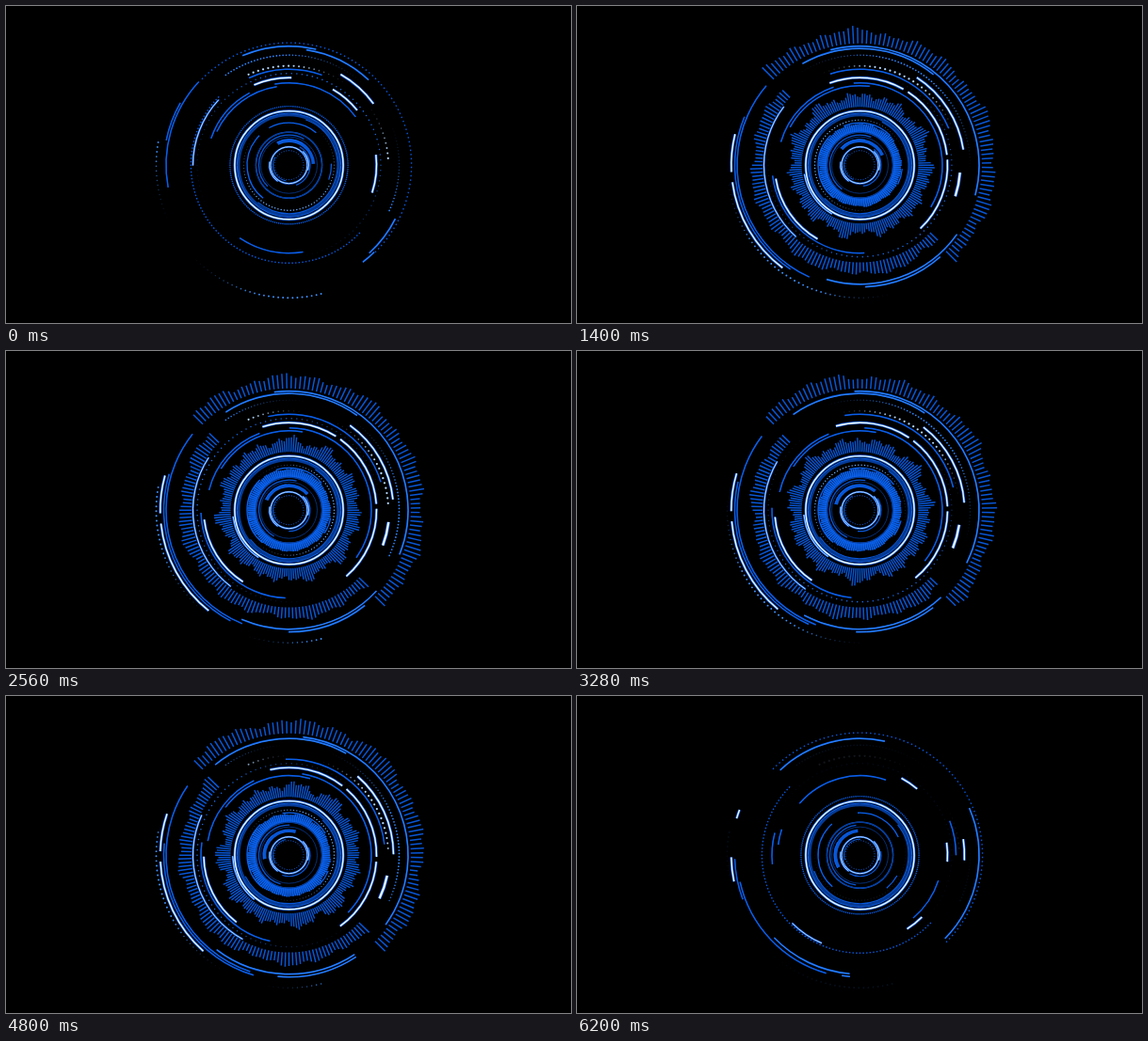
Animation, 600 px wide and 337 px high, one loop 6240 ms. Source, as an HTML page with a canvas:

```html
<!DOCTYPE html>
<html lang="en">
<head>
<meta charset="utf-8">
<title>HUD rings</title>
<style>
html, body { margin: 0; width: 100%; height: 100%; overflow: hidden; background: #000; }
canvas { display: block; width: 600px; height: 337px; }
</style>
</head>
<body>
<canvas id="stage" width="600" height="337"></canvas>
<script>
const ctx = document.getElementById('stage').getContext('2d');
const LOOP = 6240, CX = 300.5, CY = 169.2;
const BLUE = '#0a62f0', DEEP = '#0856d6', DIM = '#063a94', WHITE = '#f4faff';
const RAD = Math.PI / 180;

const clamp = x => Math.max(0, Math.min(1, x));
const ramp = (t, a, b) => clamp((t - a) / (b - a));
const smooth = x => x * x * (3 - 2 * x);
const mix = (a, b, k) => a + (b - a) * k;
const easeOut = x => 1 - (1 - x) ** 3;

function stroke(r, a, b, color, width) {
  ctx.beginPath();
  ctx.arc(CX, CY, r, Math.min(a, b) * RAD, Math.max(a, b) * RAD);
  ctx.strokeStyle = color;
  ctx.lineWidth = width;
  ctx.stroke();
}

// Each style is a halo under a narrower core.
const styles = {
  bold: [3.6, '#0a62f0', 2.2, WHITE],
  white: [2.8, '#0a62f0', 1.4, WHITE],
  thin: [2.1, '#0a62f0', .9, '#cfe6ff'],
  bright: [1.7, '#0a62f0', .7, '#3f94ff'],
  blue: [1.5, '#0a5ce4', .5, '#0a62f0']
};

function line(r, a, b, style = 'blue') {
  if (Math.abs(a - b) < 0.2) return;
  const [halo, outer, core, inner] = styles[style];
  stroke(r, a, b, outer, halo);
  stroke(r, a, b, inner, core);
}

// r: radius, a: first angle, len: signed sweep, v: degrees per second,
// grown: part drawn at the start, left: part remaining at the end,
// back: retract towards the first angle
const arcs = [
  { r: 136.7, a: 125, len: 45.4, v: 1.4, grown: 0, left: .24, style: 'white' },
  { r: 136.7, a: 175, len: 17, v: 1.4, grown: 0, left: .24, style: 'white' },
  { r: 111, a: -60.4, len: 48.5, v: 2.37, grown: .5, left: .24, style: 'white' },
  { r: 93, a: -113.5, len: 50, v: 2.3, grown: .5, left: .25, style: 'white' },
  { r: 93, a: -60, len: 50, v: 2.3, grown: .42, left: .25, style: 'white' },
  { r: 93, a: -6.8, len: 50, v: 2.3, grown: .5, left: .25, style: 'white' },
  { r: 90.5, a: 116.5, len: 51, v: 2.4, grown: 0, left: 0, style: 'white' },
  { r: 106.5, a: 1.2, len: 13.8, v: 2.2, grown: 0, left: 0, style: 'bold' },
  { r: 59.8, a: 116.5, len: 51, v: 2.4, grown: 0, left: 0, style: 'thin' },
  { r: 102, a: 223, len: -86, v: -3.8, grown: .5, left: .25, style: 'thin' },
  { r: 93.5, a: 80.8, len: 86, v: 4.5, grown: .5, left: .24 },
  { r: 124, a: -47, len: -68.5, v: -2.85, grown: .5, left: .81, style: 'bright' },
  { r: 126.5, a: -113, len: 119, v: 6.2, grown: .3, left: .57, style: 'bright' },
  { r: 126.5, a: 26.8, len: 70.8, v: 6.2, grown: .29, left: .58, style: 'bright' },
  { r: 129.5, a: 45.6, len: 38.7, v: 2.3, grown: .18, left: .1, style: 'bright' },
  { r: 130.5, a: 222.8, len: -106, v: -1.75, grown: .5, left: .58 },
  { r: 133, a: 209.9, len: -79, v: -5.1, grown: .23, left: .24, back: true },
  { r: 102, a: -114.6, len: 85.5, v: 4.7, grown: .52, left: .245 },
  { r: 87.5, a: -100, len: 125, v: 4, grown: .51, left: .255 },
  { r: 84.5, a: 205, len: 68.5, v: 2.5, grown: .82, left: 1 },
  { r: 87.5, a: 199, len: 55, v: -1.9, grown: .77, left: .2, back: true }
];

function drawArc(arc, t) {
  const start = arc.a + arc.v * t / 1000;
  const head = mix(arc.grown, 1, easeOut(ramp(t, arc.grown ? 0 : 60, 560)));
  const gone = (1 - arc.left) * smooth(ramp(t, 5620, 6200));
  const from = arc.back ? 0 : gone;
  const to = arc.back ? Math.min(head, 1 - gone) : head;
  line(arc.r, start + arc.len * from, start + arc.len * to, arc.style);
}

function dot(r, deg, size, color, alpha) {
  ctx.globalAlpha = alpha;
  ctx.fillStyle = color;
  ctx.beginPath();
  ctx.arc(CX + r * Math.cos(deg * RAD), CY + r * Math.sin(deg * RAD), size, 0, 7);
  ctx.fill();
  ctx.globalAlpha = 1;
}

// Dots lit by a wave that runs from the last angle back to the first.
function dotTrail(r, a, b, count, size, color, peak, t) {
  const fade = 1 - .9 * ramp(t, 5750, 6200);
  const centre = peak - t / 2080;
  for (let i = 0; i < count; i++) {
    const u = i / count;
    let d = u - centre;
    d = Math.abs(d - Math.round(d));
    const glow = smooth(clamp(1 - d / .46));
    if (glow > .03) dot(r, mix(a, b, u), size * (.6 + .4 * glow), color, Math.min(1, glow * 1.25) * fade);
  }
}

// Rounded lobes along the row, with a little jitter from bar to bar.
function level(u, lobes, t, seed) {
  const s = t / 1000, x = u * Math.PI * 2;
  const broad = Math.sin(x * lobes + seed + Math.sin(s * 2.3) * 2)
    * (.6 + .4 * Math.sin(x * 3 - s * 3.1 + seed));
  const mid = Math.sin(x * (lobes * 2 + 3) - s * 5 + seed * 2);
  const fine = Math.sin(x * lobes * 5.3 + s * 9 + seed);
  return clamp(.45 + .3 * broad + .14 * mid + .1 * fine);
}

function spectrum(r, a, b, count, low, high, width, lobes, seed, color, t) {
  const power = smooth(ramp(t, 60, 520)) * (1 - smooth(ramp(t, 5700, 6140)));
  ctx.beginPath();
  for (let i = 0; i < count; i++) {
    const u = i / count, deg = mix(a, b, u) * RAD;
    const end = r + .8 + power * mix(low, high, level(u, lobes, t, seed));
    const c = Math.cos(deg), s = Math.sin(deg);
    ctx.moveTo(CX + (r - .6) * c, CY + (r - .6) * s);
    ctx.lineTo(CX + end * c, CY + end * s);
  }
  ctx.strokeStyle = color;
  ctx.lineWidth = width;
  ctx.stroke();
}

function drawCore(t) {
  const s = t / 1000;
  stroke(53.5, 0, 360, DIM, 3);
  stroke(55.2, 0, 360, BLUE, 1);
  stroke(51.5, -70 + s * 5, 130 + s * 5, DEEP, 1.2);
  line(57.6, 0, 360, 'white');

  stroke(44.5, 128 + s * .5, 225 + s * .5, BLUE, 1.3);
  stroke(45, -118 + s * 4, -50 + s * 4, BLUE, 1.3);
  stroke(45, -2 + s * 5, 20 + s * 5, BLUE, 1.2);
  stroke(35, 0, 360, DIM, 1.2);
  stroke(32, 135 - s * 6, 300 - s * 6, DEEP, 1.3);
  stroke(30, 0, 360, DIM, .8);

  const a = -118 - s * 14.8;
  stroke(26, a, a + 115, DEEP, 3.6);
  stroke(27.5, a, a + 60, BLUE, 1);
  stroke(22.5, -60 + s * 8, 70 + s * 8, DEEP, 1.2);
  line(19.5, 0, 360, 'thin');
  line(20.8, 125, 190, 'thin');
  line(20.8, -45, 15, 'thin');
  stroke(17, 100 + s * 10, 210 + s * 10, BLUE, 1);
  for (let i = 0; i < 36; i++) dot(15.5, i * 10 + s * 12, .6, BLUE, .8);
}

function draw(t) {
  ctx.fillStyle = '#000';
  ctx.fillRect(0, 0, 600, 337);

  spectrum(130, -135, 47, 91, 7, 18, 1.5, 5, 1, DEEP, t);
  spectrum(104, 44, 226, 91, 6, 16, 1.5, 4, 4, DEEP, t);
  spectrum(62.5, 0, 360, 180, 4, 19, 1.4, 11, 7, DEEP, t);
  spectrum(35, 0, 360, 120, 7, 9.5, 1.8, 9, 2, BLUE, t);

  dotTrail(117, -125, 26, 90, .9, '#2f86ff', 1.1, t);
  dotTrail(105.5, -114, -1, 38, 1.15, '#b4d8ff', 1.1, t);
  dotTrail(141, 76, 192, 56, 1, '#3f92ff', 1.1, t);
  dotTrail(97.5, 0, 360, 110, .8, '#1a66dc', .83, t);
  dotTrail(48, 0, 360, 90, .75, '#6aaeff', .24, t);

  drawCore(t);
  for (const arc of arcs) drawArc(arc, t);
}

const begin = performance.now();
function tick(now) {
  draw(Math.max(0, now - begin) % LOOP);
  requestAnimationFrame(tick);
}
draw(0);
requestAnimationFrame(tick);
</script>
</body>
</html>
```
